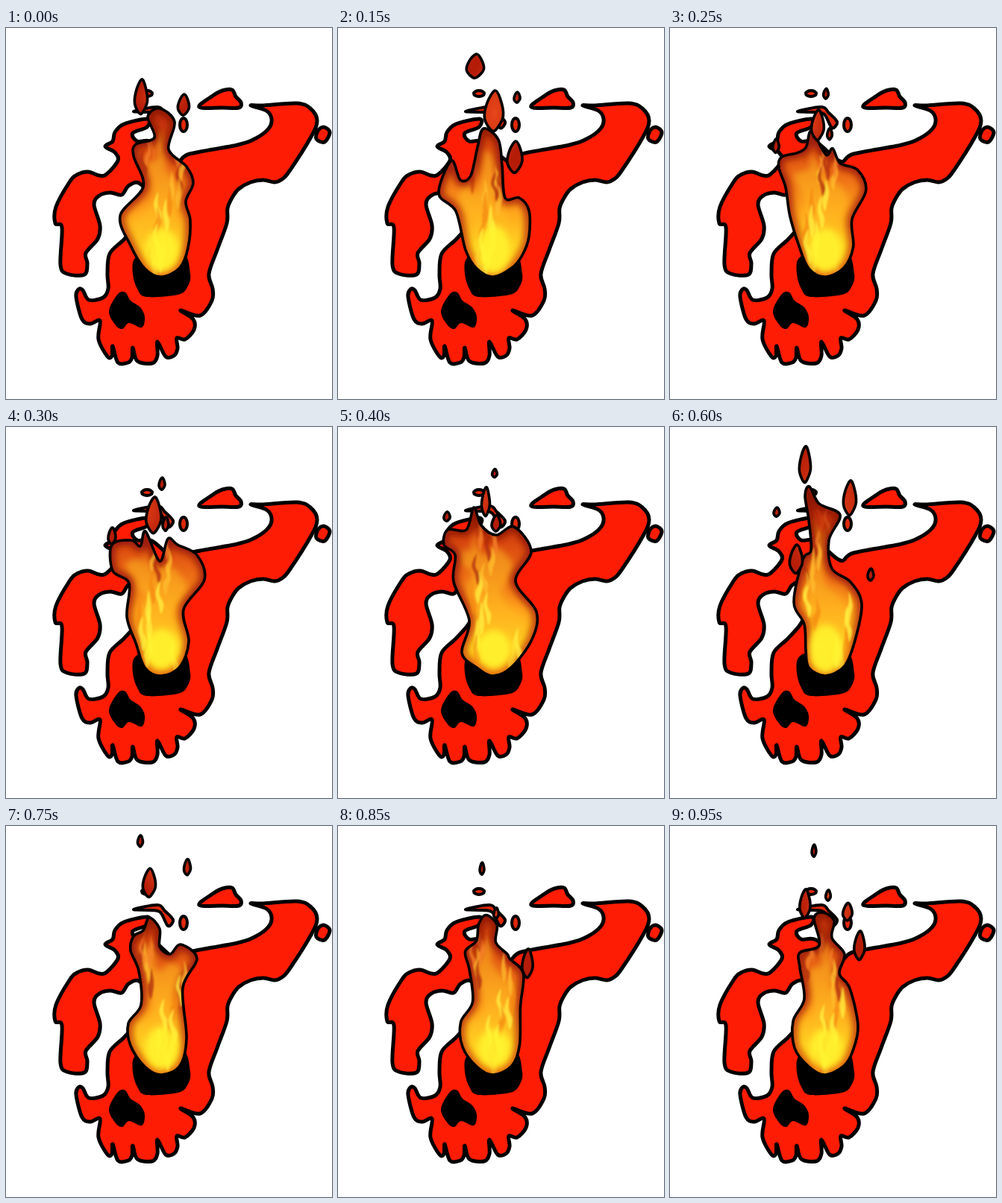
An HTML page for the animation above (1 s loop, 437 px wide and 498 px high).

```html
<!DOCTYPE html>
<html lang="en">
<head>
<meta charset="utf-8">
<title>Burning skull</title>
<style>
html, body { margin: 0; width: 100%; height: 100%; overflow: hidden; background: #fff; }
svg { display: block; width: 437px; height: 498px; }
</style>
</head>
<body>
<svg viewBox="0 0 437 498">
  <defs>
    <linearGradient id="heat" gradientUnits="userSpaceOnUse" x1="0" y1="105" x2="0" y2="334">
      <stop offset="0" stop-color="#b8280c"/>
      <stop offset=".22" stop-color="#d9480f"/>
      <stop offset=".42" stop-color="#ee7016"/>
      <stop offset=".62" stop-color="#ffa41c"/>
      <stop offset=".82" stop-color="#ffd722"/>
      <stop offset="1" stop-color="#ffc91c"/>
    </linearGradient>
    <linearGradient id="rim" gradientUnits="userSpaceOnUse" x1="0" y1="105" x2="0" y2="334">
      <stop offset="0" stop-color="#8e1606"/>
      <stop offset=".5" stop-color="#b02a08"/>
      <stop offset="1" stop-color="#e8740e"/>
    </linearGradient>
    <radialGradient id="ember">
      <stop offset="0" stop-color="#e8461a"/>
      <stop offset="1" stop-color="#b51c08"/>
    </radialGradient>
    <filter id="soft" x="-50%" y="-50%" width="200%" height="200%"><feGaussianBlur stdDeviation="4"/></filter>
    <filter id="blur" x="-20%" y="-20%" width="140%" height="140%"><feGaussianBlur stdDeviation="1.3"/></filter>
    <filter id="ink" x="-5%" y="-5%" width="110%" height="110%"><feGaussianBlur stdDeviation=".6"/></filter>
    <clipPath id="inside"><path class="outline"/></clipPath>
  </defs>
  <g filter="url(#ink)" fill="#ff1c04" stroke="#000" stroke-width="5" stroke-linejoin="round">
    <path id="body"/>
    <path id="islet"/>
    <path id="dot"/>
    <g fill="#000" stroke="none"><path id="eye"/><path id="nose"/></g>
    <path d="M233 378 Q240 384 249 386" fill="none" stroke-width="4"/>
  </g>
  <g fill="#e0280a" stroke="#000" stroke-width="4">
    <path id="arc"/>
    <ellipse cx="189" cy="88" rx="7" ry="4"/>
    <ellipse cx="238" cy="130" rx="5" ry="9"/>
  </g>
  <g clip-path="url(#inside)">
    <path class="outline" fill="url(#heat)"/>
    <path id="core" fill="#ffc023" opacity=".5" filter="url(#soft)"/>
    <path class="outline" fill="none" stroke="url(#rim)" stroke-width="15" filter="url(#soft)"/>
    <g id="tongues" filter="url(#blur)"></g>
    <ellipse id="glow" cx="209" cy="298" rx="22" ry="30" fill="#fff52e" opacity=".85" filter="url(#soft)"/>
  </g>
  <path class="outline" fill="none" stroke="#000" stroke-width="3.6" stroke-linejoin="round"/>
  <path id="sparks" fill="url(#ember)" stroke="#000" stroke-width="3.6" stroke-linejoin="round"/>
</svg>
<script>
const LOOP = 1000, STEP = 50;
const byId = id => document.getElementById(id);
const mix = (a, b, k) => a + (b - a) * k;

// "x,y x,y ..." to a list of points
const points = text => text.trim().split(/\s+/).map(p => p.split(",").map(Number));

// Closed smooth curve through the points
function smooth(pts) {
  const n = pts.length, at = i => pts[(i + n) % n];
  let d = "M" + pts[0];
  for (let i = 0; i < n; i++) {
    const [a, b, c, e] = [at(i - 1), at(i), at(i + 1), at(i + 2)];
    const near = [0, 1].map(j => (b[j] + (c[j] - a[j]) / 6).toFixed(1));
    const far = [0, 1].map(j => (c[j] - (e[j] - b[j]) / 6).toFixed(1));
    d += `C${near} ${far} ${c}`;
  }
  return d + "Z";
}

function shape(id, text) {
  byId(id).setAttribute("d", smooth(points(text)));
}

const arm = `328,104 345,104 390,101 408,108 417,124 409,146 380,192 370,203 360,207
  345,204 328,207 312,216 303,228 297,242 296,262 283,298 272,330`;
const skull = `277,350 276,366 260,386 234,379 251,391 252,405 240,418 229,416 230,430
  225,440 214,441 203,421 203,440 196,450 176,447 170,429 169,442 164,449 150,449
  143,427 142,440 136,441 124,418 126,393 113,397 102,391 94,361 97,351 103,352
  111,365 130,362 137,350 136,330 139,303 158,284 174,266 182,250`;
const limb = `190,225 178,208 164,212 155,224 140,221 125,225 118,237 126,265 123,283
  107,302 109,316 105,331 82,330 73,318 75,268 66,262 67,240 85,207 95,197 110,193
  125,198 135,196 150,178 146,167 133,159 143,152 146,140 158,129 190,122 189,133
  170,141 176,152 196,153 228,179 246,169 310,157 335,148 352,135 356,122 349,111`;

shape("body", arm + " " + skull + " " + limb);
shape("islet", "259,106 277,91 290,84 303,83 308,92 315,100 312,107 290,107");
shape("dot", "416,149 418,138 426,133 434,140 427,153");
shape("eye", "172,310 170,330 176,350 188,361 230,358 243,348 247,330 236,300 190,302");
shape("nose", "150,357 160,355 167,366 180,375 186,388 182,402 165,396 156,404 147,399 138,380");
shape("arc", "171,112 203,106 213,114 224,126 217,134 207,116 194,113");

// Flame poses: left edge going up, tip, right edge going down; the foot is shared
const poses = [];
function pose(t, text) {
  poses.push({ t, pts: [[208, 334], [186, 323], ...points(text), [233, 322]] });
}
pose(0, `167,292 153,252 184,213 171,172 174,156 199,147 190,119 206,108
  226,126 218,163 242,186 251,208 241,233 247,258 244,295`);
pose(150, `171,298 158,246 135,222 152,178 164,204 178,198 187,160 195,135
  215,150 220,185 224,228 243,228 256,245 256,280 247,305`);
pose(300, `174,290 162,255 165,210 143,193 142,158 168,152 180,160 187,140
  206,180 217,150 230,158 256,172 266,205 238,245 245,288`);
pose(400, `166,303 176,260 155,208 157,172 142,158 147,138 172,138 182,108
  192,132 212,145 236,134 259,167 238,207 266,248 260,285`);
pose(600, `182,300 180,265 166,235 178,178 189,165 186,125 181,92 187,80
  200,103 228,118 213,152 217,190 242,208 257,238 247,290`);
pose(750, `167,295 164,265 181,240 178,195 167,167 171,148 184,140 192,123
  206,138 206,162 220,172 234,159 256,178 237,217 242,285`);
pose(950, `167,298 165,262 180,232 174,190 174,170 200,160 193,124 205,116
  220,127 217,150 234,172 227,198 241,218 252,268 245,302`);
poses.push({ t: LOOP, pts: poses[0].pts });

function poseAt(t) {
  const i = poses.findIndex(p => p.t > t), a = poses[i - 1], b = poses[i];
  const k = (t - a.t) / (b.t - a.t);
  return a.pts.map((p, j) => p.map((v, c) => mix(v, b.pts[j][c], k)));
}

// Sparks: centre x, y, width, height at their largest; they rise and shrink around that time
const sparks = [];
function spark(t, text) {
  for (const box of points(text)) sparks.push({ t, box });
}
spark(0, "181,92,17,46 238,103,15,28");
spark(150, "184,51,23,32 240,93,8,14 209,111,25,54 237,173,20,42");
spark(300, "209,76,8,16 198,118,20,48 214,130,8,18 142,146,10,22");
spark(450, "198,88,13,46 210,50,8,13 146,108,10,15 212,117,14,26");
spark(600, "181,50,15,48 241,95,17,46 143,114,8,12 269,198,8,16 169,177,17,38");
spark(750, "192,76,17,38 180,20,7,15 243,55,9,21");
spark(900, "193,45,7,19 212,105,8,17 254,172,17,46");

const blob = points("-.5,.2 -.36,-.2 .05,-.5 .34,-.3 .5,.12 .2,.42 -.1,.5");

function sparkPath({ t: peak, box: [x, y, w, h] }, t) {
  const age = (t - peak + LOOP * 1.5) % LOOP - LOOP / 2;
  if (age < -100 || age >= 100) return "";
  const size = 1 - Math.abs(age) / 300;
  return smooth(blob.map(p => [x + p[0] * w * size, y - age * .24 + p[1] * h * size]));
}

const tongues = Array.from({ length: 18 }, () =>
  byId("tongues").appendChild(document.createElementNS("http://www.w3.org/2000/svg", "path")));
const outlines = document.querySelectorAll(".outline");
const opposite = (pts, i) => pts[(pts.length - i) % pts.length];

// Middle and half width of the flame at height u, 0 at the foot
function spine(pts, u) {
  const s = 1 + Math.min(u, .999) * 7, i = Math.floor(s), k = s - i;
  const left = pts[i].map((v, c) => mix(v, pts[i + 1][c], k));
  const right = opposite(pts, i).map((v, c) => mix(v, opposite(pts, i + 1)[c], k));
  return { x: (left[0] + right[0]) / 2, y: (left[1] + right[1]) / 2, half: Math.abs(right[0] - left[0]) / 2 };
}

// A bent lick of fire that climbs the flame and fades out
function drawTongue(el, i, pts, t) {
  const u = (i * .381 + t / LOOP) % 1, s = spine(pts, u * .9);
  const lane = ((i * 7) % 5 - 2) / 3.2;
  const x = s.x + lane * s.half, y = s.y;
  const w = mix(9, 5, u), h = mix(25, 17, u), bend = 5 * Math.sin(i * 2 + u * 9);
  el.setAttribute("d", smooth([
    [x, y + h], [x - w * .5, y + h * .3], [x - w * .4 + bend, y - h * .3],
    [x + bend * .3, y - h], [x + w * .3 + bend, y - h * .2], [x + w * .5, y + h * .4]
  ]));
  const dark = i % 3 === 0;
  const colour = dark ? (u < .45 ? "#f58a14" : "#b02c0a") : u < .45 ? "#fff040" : u < .7 ? "#ffbd2c" : "#f5822a";
  el.setAttribute("fill", colour);
  el.setAttribute("opacity", (.75 * Math.min(1, (1 - u) * 5, u * 8 + .1)).toFixed(2));
}

function draw(now) {
  const t = Math.floor((now % LOOP) / STEP) * STEP;
  const pts = poseAt(t), d = smooth(pts);
  outlines.forEach(el => el.setAttribute("d", d));
  const core = pts.map((p, i) => {
    const mid = (p[0] + opposite(pts, i)[0]) / 2;
    return [mix(mid, p[0], .55), mix(325, p[1], .85)];
  });
  byId("core").setAttribute("d", smooth(core));
  byId("glow").setAttribute("ry", 29 + 4 * Math.sin(t / LOOP * Math.PI * 4));
  tongues.forEach((el, i) => drawTongue(el, i, pts, t));
  byId("sparks").setAttribute("d", sparks.map(s => sparkPath(s, t)).join(""));
}

function tick(now) {
  draw(now);
  requestAnimationFrame(tick);
}
draw(0);
requestAnimationFrame(tick);
</script>
</body>
</html>
```
